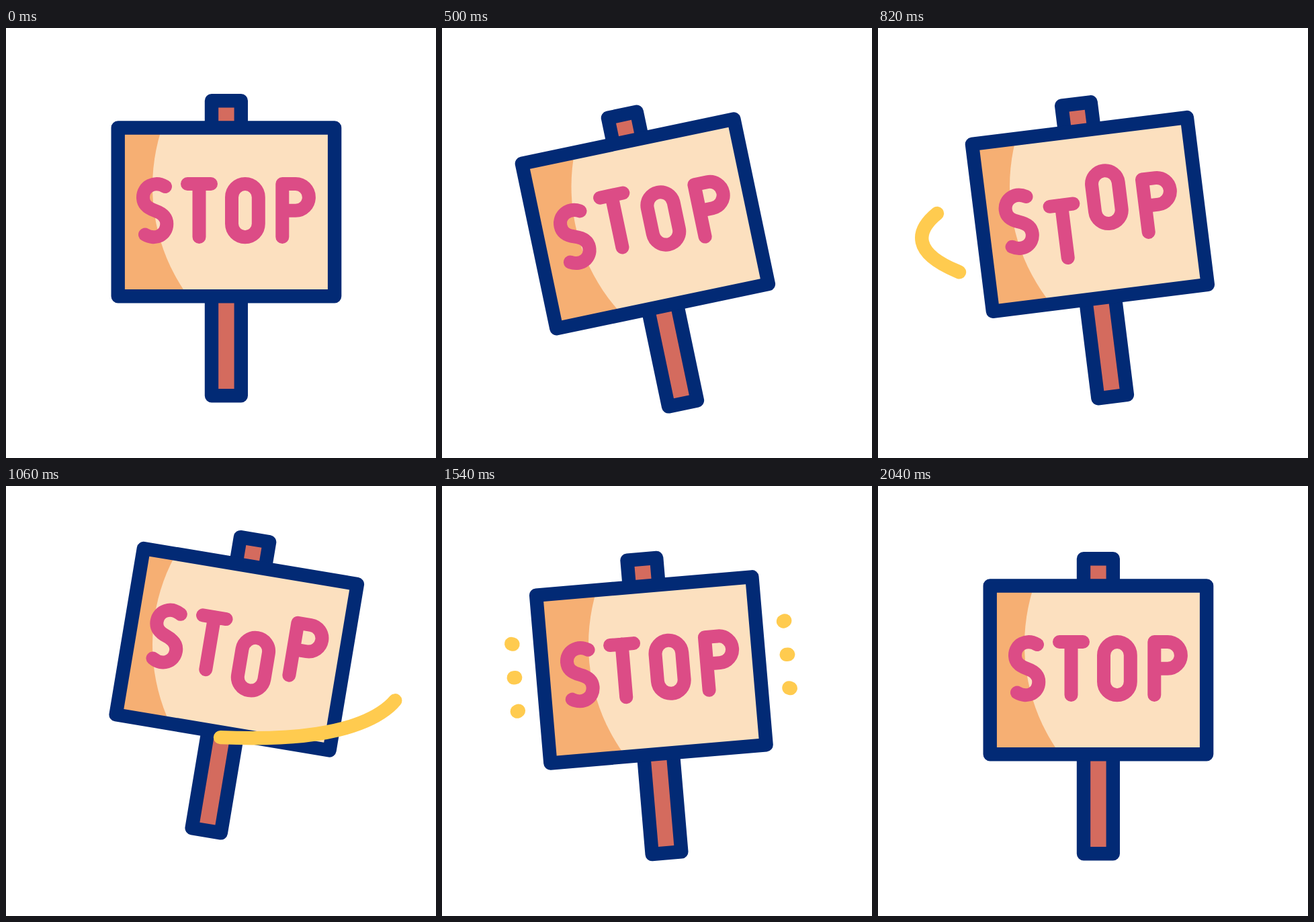
These frames come from a looping animation (640x640 px, 2100 ms). An HTML page:

```html
<!DOCTYPE html>
<html lang="en">
<head>
<meta charset="utf-8">
<title>Stop sign</title>
<style>
  html, body { margin: 0; width: 100%; height: 100%; overflow: hidden; background: #fff; }
  svg { display: block; width: 100vw; height: 100vh; }
  .line { fill: none; stroke-width: 20.4; stroke-linecap: round; stroke-linejoin: round; }
  .navy { stroke: #022a75; }
  .pink { stroke: #dc4c86; stroke-width: 20; }
  .gold { stroke: #ffcb4f; }
</style>
</head>
<body>
<svg viewBox="0 0 640 640">
  <defs>
    <clipPath id="face"><rect class="sign" x="166.7" y="148.5" width="322.4" height="250.8"/></clipPath>
  </defs>
  <g class="sign">
    <rect class="line navy" x="306" y="108.2" width="43.8" height="439" style="fill:#d46b5e"/>
    <rect x="166.7" y="148.5" width="322.4" height="250.8" fill="#f6af73"/>
  </g>
  <g clip-path="url(#face)"><circle id="light" cx="496" cy="236" r="278" fill="#fce0bf"/></g>
  <g class="sign">
    <rect class="line navy" x="166.7" y="148.5" width="322.4" height="250.8"/>
    <path class="line pink letter" d="M237 236C221 226.8 204 236 204 252C204 263 211 268 221.7 271.8C232 275.5 239.3 281 239.3 291.5C239.3 307.6 222.5 316.8 207 307.5"/>
    <path class="line pink letter" d="M270 232H305M287.5 232V311"/>
    <rect class="line pink letter" x="336" y="232" width="39.8" height="79.2" rx="19.9"/>
    <path class="line pink letter" d="M411.3 311V232H431A19.9 19.9 0 0 1 431 271.8H411.3"/>
    <g id="rays"></g>
  </g>
  <path id="swoosh" class="line gold" d="M100.5 272.5C68 299 64 331 130.5 358.5C180 379.8 240 402 300 404.7C400 409.5 505 402 555 359C570 346 580 328 580 305"/>
</svg>
<script>
const LOOP = 2100, STEP = 20;
const clamp = v => Math.max(0, Math.min(1, v));
const ease = p => (1 - Math.cos(Math.PI * clamp(p))) / 2;
const span = (t, a, b) => ease((t - a) / (b - a));

// Smooth curve through [time, value] keys without overshoot.
function track(keys) {
  const last = keys.length - 1;
  const rate = i => (keys[i + 1][1] - keys[i][1]) / (keys[i + 1][0] - keys[i][0]);
  const slope = keys.map((k, i) => {
    if (i === 0 || i === last) return 0;
    const a = rate(i - 1), b = rate(i);
    return a * b <= 0 ? 0 : 2 * a * b / (a + b);
  });
  return t => {
    if (t <= keys[0][0]) return keys[0][1];
    if (t >= keys[last][0]) return keys[last][1];
    let i = 0;
    while (t > keys[i + 1][0]) i++;
    const [t0, v0] = keys[i], [t1, v1] = keys[i + 1];
    const h = t1 - t0, p = (t - t0) / h, q = 1 - p;
    return v0 * (1 + 2 * p) * q * q + slope[i] * h * p * q * q
         + v1 * p * p * (3 - 2 * p) - slope[i + 1] * h * p * p * q;
  };
}

const angle = track([[120, 0], [500, -11.85], [670, -15.4], [820, -7.1], [1075, 9.6],
                     [1360, -3.2], [1460, -5.2], [1720, -3], [2040, 0]]);
const shiftX = track([[120, 0], [500, -25.5], [670, -33], [820, -12.5], [1075, 15.5],
                      [1360, -14.5], [1460, -17.5], [1720, -11], [2040, 0]]);
const shiftY = track([[120, 0], [500, 17.5], [680, 32.4], [820, 3.5], [1010, -33],
                      [1060, -30.7], [1180, -19.5], [1360, -5], [1480, 0]]);
const lightX = track([[120, 0], [500, -25.5], [660, -32.5], [820, -22], [1060, 0]]);
const head = track([[710, 0], [820, 124], [1060, 574], [1160, 640]]);
const tail = track([[820, 0], [1060, 301], [1280, 640]]);

// Each letter hops up, dips, then settles, one after the other.
function hop(t) {
  if (t < 150) return -23 * span(t, 0, 150);
  if (t < 390) return -23 + 46 * span(t, 150, 390);
  return 23 - 23 * span(t, 390, 550);
}

const all = s => [...document.querySelectorAll(s)];
const signs = all('.sign'), letters = all('.letter');
const light = document.getElementById('light');
const swoosh = document.getElementById('swoosh');
const rayBox = document.getElementById('rays');
const length = swoosh.getTotalLength();

// Inner and outer ends, measured from the middle of the board.
const rays = [];
for (const side of [-1, 1])
  for (const [x0, y0, x1, y1] of [[202, -55.7, 230, -66], [202.5, -6, 233.5, -6], [202, 43.7, 230, 54]]) {
    const el = document.createElementNS('http://www.w3.org/2000/svg', 'line');
    el.setAttribute('class', 'line gold');
    rayBox.append(el);
    rays.push({ el, x0: side * x0, y0, x1: side * x1, y1 });
  }

function put(el, attrs) {
  for (const k in attrs) el.setAttribute(k, attrs[k]);
}

function drawRays(t) {
  const out = span(t, 1500, 1720), cut = span(t, 1730, 1880);
  rayBox.style.display = out > 0 && cut < 1 ? '' : 'none';
  for (const { el, x0, y0, x1, y1 } of rays) {
    const x = p => 328 + x0 + (x1 - x0) * p, y = p => 274 + y0 + (y1 - y0) * p;
    put(el, { x1: x(cut), y1: y(cut), x2: x(out), y2: y(out) });
  }
}

function drawSwoosh(t, x, y) {
  const from = Math.min(tail(t), length), to = Math.min(head(t), length);
  swoosh.style.display = to - from > 0.5 ? '' : 'none';
  put(swoosh, {
    transform: `translate(${x} ${y})`,
    'stroke-dasharray': `${Math.max(0, to - from)} 2000`,
    'stroke-dashoffset': -from
  });
}

function draw(t) {
  const x = shiftX(t), y = shiftY(t);
  const pose = `translate(${x} ${y}) rotate(${angle(t)} 328 274)`;
  signs.forEach(el => put(el, { transform: pose }));
  letters.forEach((el, i) => put(el, { transform: `translate(0 ${hop(t - 232 - 200 * i)})` }));
  put(light, { cx: 496 + lightX(t) });
  drawRays(t);
  drawSwoosh(t, x, y);
}

const start = performance.now();
function tick() {
  const t = (performance.now() - start) % LOOP;
  draw(Math.floor(t / STEP) * STEP);
  requestAnimationFrame(tick);
}
tick();
</script>
</body>
</html>
```
